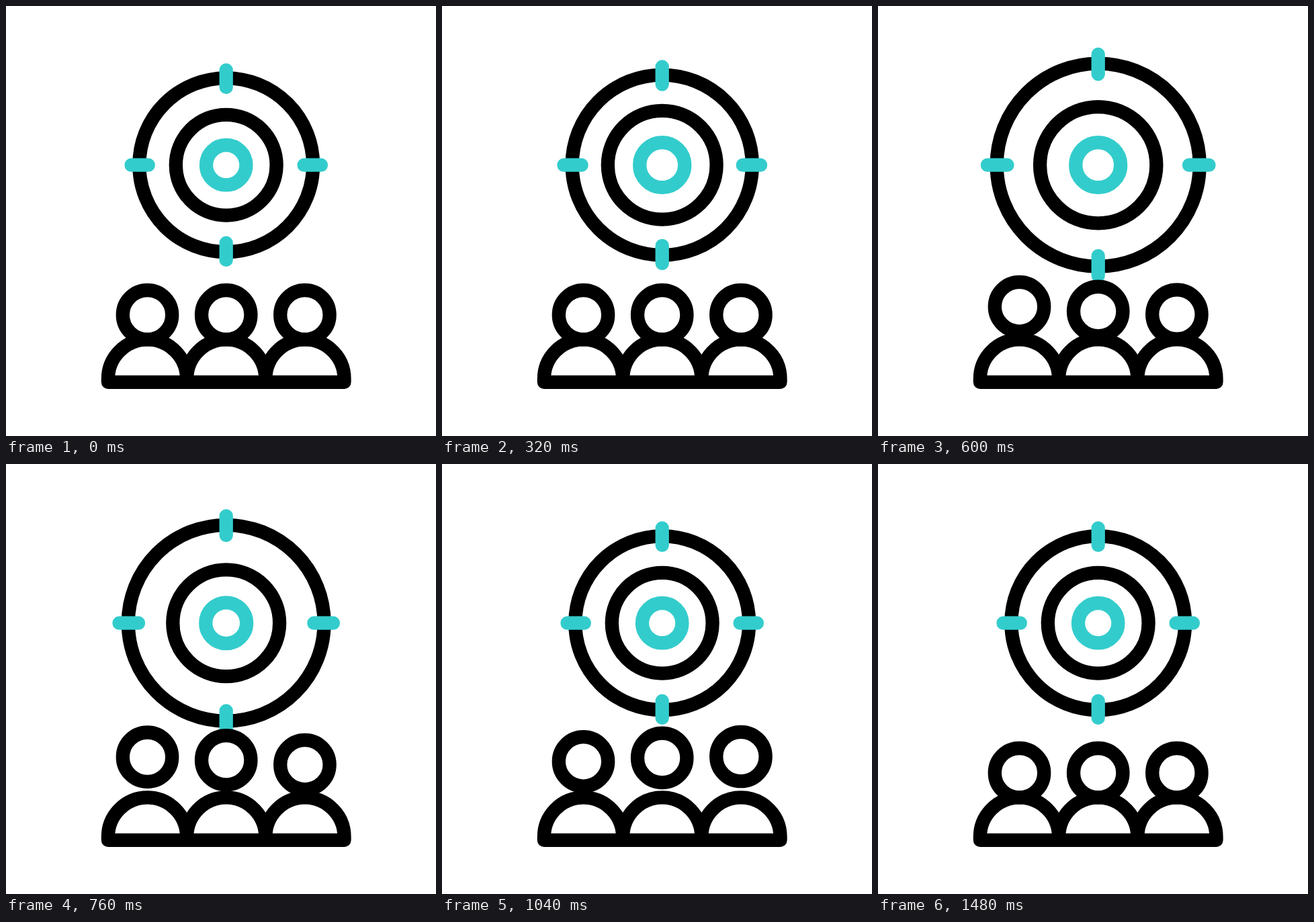
Animation of 640 by 640 pixels, one loop 1680 ms. Source, as an HTML page:

```html
<!DOCTYPE html>
<html lang="en">
<head>
<meta charset="utf-8">
<title>Target audience</title>
<style>
html, body { margin: 0; width: 100%; height: 100%; overflow: hidden; background: #fff; }
svg { display: block; width: 100vw; height: 100vh; }
svg * { fill: none; stroke: #000; stroke-width: 20.3; stroke-linecap: round; stroke-linejoin: round; }
svg .accent { stroke: #33cccc; }
</style>
</head>
<body>
<svg id="stage" viewBox="0 0 640 640"></svg>
<script>
const LOOP = 1680, STEP = 40;
const CX = 327.7, CY = 236.7;
const GROW = 0.167, LIFT = 24.2, HEAD_Y = 459.7;
const stage = document.getElementById('stage');

function add(tag, attrs) {
  const el = document.createElementNS('http://www.w3.org/2000/svg', tag);
  for (const key in attrs) el.setAttribute(key, attrs[key]);
  return stage.appendChild(el);
}

function ease(t, start, length) {
  const u = Math.min(1, Math.max(0, (t - start) / length));
  return u * u * (3 - 2 * u);
}

// Rises from 0 to 1, holds, then falls back.
const pulse = (t, up, upLength, down, downLength) =>
  ease(t, up, upLength) - ease(t, down, downLength);

const rings = [
  { r: 129.4, up: 212, down: 646 },
  { r: 74.9, up: 145, down: 546 },
  { r: 29.7, up: 72, down: 486, cls: 'accent' }
];
for (const ring of rings) {
  ring.el = add('circle', { cx: CX, cy: CY, r: ring.r, class: ring.cls || '' });
}
const ticks = add('path', { class: 'accent' });

const people = [-1, 0, 1].map((side, i) => {
  const x = CX + side * 117.2;
  add('path', { d: `M${x - 58.6} 559.8V555a58.6 58.6 0 0 1 117.2 0V559.8Z` });
  return { head: add('circle', { cx: x, cy: HEAD_Y, r: 36.7 }), delay: i * 80 };
});

function tickPath(scale) {
  const a = 115.9 * scale, b = 141.2 * scale;
  return [[0, -1], [1, 0], [0, 1], [-1, 0]].map(([x, y]) =>
    `M${CX + x * a} ${CY + y * a}L${CX + x * b} ${CY + y * b}`).join('');
}

function draw(t) {
  rings.forEach((ring, i) => {
    const scale = 1 + GROW * pulse(t, ring.up, 360, ring.down, 360);
    ring.el.setAttribute('r', ring.r * scale);
    if (i === 0) ticks.setAttribute('d', tickPath(scale));
  });
  for (const { head, delay } of people) {
    head.setAttribute('cy', HEAD_Y - LIFT * pulse(t - delay, 400, 400, 890, 410));
  }
}

const begin = performance.now();
function tick() {
  const t = (performance.now() - begin) % LOOP;
  draw(Math.floor(t / STEP) * STEP);
  requestAnimationFrame(tick);
}
tick();
</script>
</body>
</html>
```
